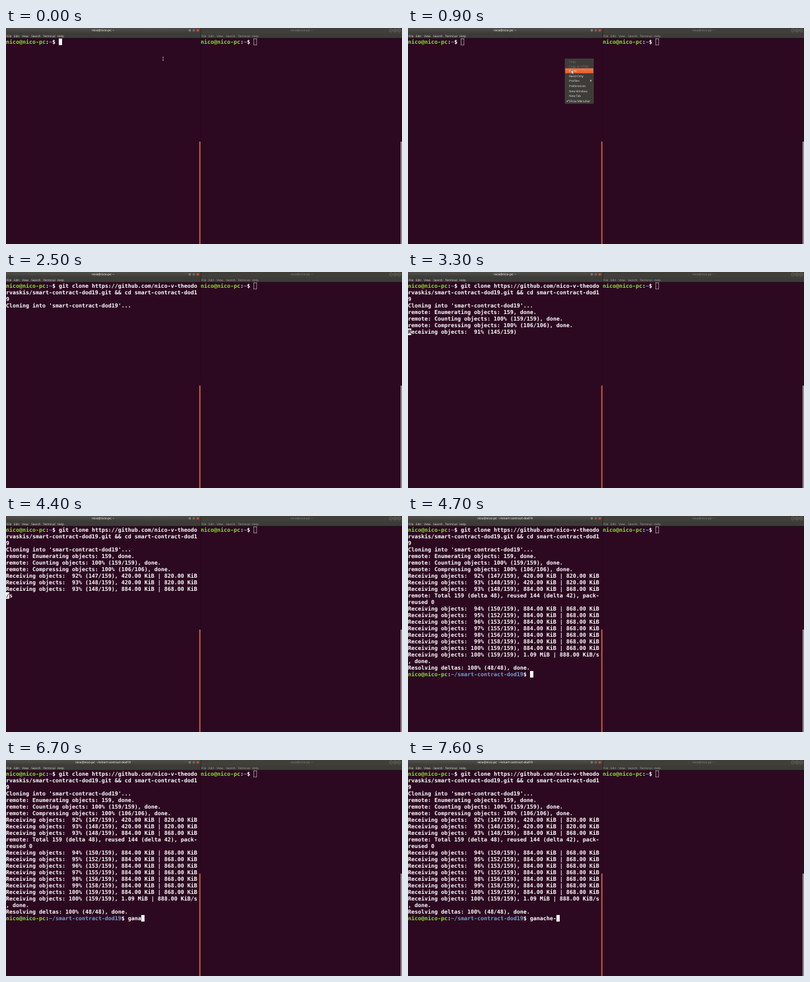
Animation of 600 by 329 pixels, one loop 8000 ms. Source, as an HTML page:

```html
<!DOCTYPE html>
<html lang="en">
<head>
<meta charset="utf-8">
<title>Terminal session</title>
<style>
  html, body { margin: 0; width: 100%; height: 100%; overflow: hidden; background: #2c0920; }
  svg { display: block; width: 100vw; height: 100vh; }
  text { white-space: pre; text-rendering: geometricPrecision; }
  .term text { font: bold 8.3px "DejaVu Sans Mono", monospace; fill: #fff; }
  .ui { font: 4.55px "Open Sans", "Noto Sans", sans-serif; }
  .title { font-weight: 600; text-anchor: middle; }
</style>
</head>
<body>
<svg id="stage" viewBox="0 0 600 329">
  <defs>
    <linearGradient id="bar" x2="0" y2="1">
      <stop offset="0" stop-color="#504f49"/>
      <stop offset="1" stop-color="#3c3b37"/>
    </linearGradient>
    <linearGradient id="hot" x2="0" y2="1">
      <stop offset="0" stop-color="#f0794c"/>
      <stop offset="1" stop-color="#e65a2b"/>
    </linearGradient>
  </defs>
  <rect width="600" height="329" fill="#2c0920"/>
</svg>
<script>
const LOOP = 8000, STEP = 100;
const BG = '#2c0920', GREEN = '#8ae234', BLUE = '#729fcf', WHITE = '#fff';
const CELL = 8.3 * 0.60205, ROW = 10, TOP = 16.1, RIGHT = 295;
const stage = document.getElementById('stage');

function add(parent, tag, attrs = {}, content) {
  const el = document.createElementNS('http://www.w3.org/2000/svg', tag);
  for (const k in attrs) el.setAttribute(k, attrs[k]);
  if (content !== undefined) el.textContent = content;
  parent.append(el);
  return el;
}

// Window frames
function frame(x, width, active, titleX) {
  const g = add(stage, 'g', { class: 'ui' });
  const ink = active ? '#dfdbd2' : '#a5a198';
  add(g, 'rect', { x, y: 0, width, height: 15.2, fill: '#3c3b37' });
  add(g, 'rect', { x, y: 0, width, height: 8.5, fill: active ? 'url(#bar)' : '#403f3a' });
  const labels = [['File', 1], ['Edit', 12], ['View', 24.3], ['Search', 38.3], ['Terminal', 56.2], ['Help', 78]];
  for (const [label, dx] of labels) add(g, 'text', { x: x + dx, y: 14, fill: ink }, label);
  const right = x + width;
  [16.6, 10.5, 4.4].forEach((dx, i) => {
    const close = active && i === 2;
    add(g, 'circle', {
      cx: right - dx, cy: 3.6, r: 2.4, 'stroke-width': 0.6,
      fill: close ? '#e4572c' : active ? '#85827a' : '#403f3a',
      stroke: active ? '#2f2e2a' : '#77746c'
    });
    const d = ['M-1 0H1', 'M-.8-.8H.8V.8H-.8Z', 'M-.9-.9L.9.9M.9-.9L-.9.9'][i];
    add(g, 'path', {
      d, transform: `translate(${right - dx} 3.6)`, fill: 'none',
      stroke: active ? '#33322e' : '#77746c', 'stroke-width': 0.5
    });
  });
  add(g, 'rect', { x: right - 2.2, y: 173, width: 2, height: 156, fill: active ? '#cb6449' : '#a3989d' });
  return add(g, 'text', { class: 'title', x: titleX, y: 5.3, fill: active ? '#e6e2d9' : '#7d7a72' }, 'nico@nico-pc: ~');
}

const title = frame(0, 295, true, 147);
frame(RIGHT, 305, false, 448);
add(stage, 'rect', { x: 294.8, y: 0, width: 0.5, height: 329, fill: '#230719' });

// Terminal contents: a row is a list of [text, colour] runs
const prompt = (path, rest = '') => [['nico@nico-pc', GREEN], [':', WHITE], [path, BLUE], ['$ ' + rest, WHITE]];
const plain = text => [[text, WHITE]];

function drawRow(parent, x, row, runs) {
  const el = add(parent, 'text', { x, y: TOP + row * ROW + 7.7 });
  for (const [text, fill] of runs) add(el, 'tspan', { style: 'fill:' + fill }, text);
}

function drawCursor(parent, x, row, col, hollow, char) {
  const left = x + col * CELL, y = TOP + row * ROW;
  if (hollow) {
    add(parent, 'rect', { x: left + 0.3, y: y + 0.2, width: CELL - 0.4, height: 9.6, fill: 'none', stroke: '#d8cfd5', 'stroke-width': 0.6 });
    return;
  }
  add(parent, 'rect', { x: left, y, width: CELL, height: ROW, fill: WHITE });
  if (char) add(parent, 'text', { x: left, y: y + 7.7, style: 'fill:' + BG }, char);
}

const other = add(stage, 'g', { class: 'term' });
drawRow(other, RIGHT, 0, prompt('~'));
drawCursor(other, RIGHT, 0, 16, true);

// Output events: [time, row, text]; later ones overwrite the row
const repo = 'smart-contract-dod19';
const got = (pct, n, tail = '') => `Receiving objects: ${String(pct).padStart(3)}% (${n}/159)${tail}`;
const fast = ', 884.00 KiB | 868.00 KiB', slow = ', 420.00 KiB | 820.00 KiB';
const output = [
  [1200, 1, `rvaskis/${repo}.git && cd ${repo.slice(0, -1)}`],
  [1200, 2, '9'],
  [1900, 3, `Cloning into '${repo}'...`],
  [3200, 4, 'remote: Enumerating objects: 159, done.'],
  [3200, 5, 'remote: Counting objects: 100% (159/159), done.'],
  [3200, 6, 'remote: Compressing objects: 100% (106/106), done.'],
  [3300, 7, got(91, 145)],
  [3400, 7, got(92, 147)],
  [3800, 7, got(92, 147, slow)],
  [3800, 8, '/s'],
  [3900, 8, got(93, 148, slow)],
  [3900, 9, '/s'],
  [4400, 9, got(93, 148, fast)],
  [4400, 10, '/s'],
  [4500, 10, 'remote: Total 159 (delta 48), reused 144 (delta 42), pack-'],
  [4500, 11, 'reused 0']
];
[150, 152, 153, 155, 156, 158, 159].forEach((n, i) => {
  const t = i < 2 ? 4500 : i < 5 ? 4600 : 4700;
  output.push([t, 12 + i, got(94 + i, n, fast)], [t, 13 + i, '/s']);
});
output.push(
  [4700, 19, got(100, 159, ', 1.09 MiB | 888.00 KiB/s')],
  [4700, 20, ', done.'],
  [4700, 21, 'Resolving deltas: 100% (48/48), done.']
);

const places = [[0, 0, 16], [1200, 2, 1], [1900, 4, 0], [3300, 7, 0], [3800, 8, 0], [3900, 9, 0],
  [4400, 10, 0], [4500, 14, 0], [4600, 17, 0], [4700, 22, 37]];
const blink = [1700, 1900, 2500, 3100, 3700, 4300, 4900, 5500, 6100, 6300];
const keys = [6400, 6500, 6700, 6700, 6900, 7200, 7300, 7600];
const passed = (times, t) => times.filter(v => v <= t).length;

const term = add(stage, 'g', { class: 'term' });
function drawTerminal(t) {
  term.replaceChildren();
  const rows = [prompt('~', t < 1200 ? '' : 'git clone https://github.com/nico-v-theodo')];
  for (const [at, row, text] of output) if (at <= t) rows[row] = plain(text);
  const typed = passed(keys, t);
  if (t >= 4700) rows[22] = prompt('~/' + repo, 'ganache-'.slice(0, typed));
  rows.forEach((runs, i) => drawRow(term, 0, i, runs));

  if (passed(blink, t) % 2 === 0) {
    const [, row, col] = places.filter(p => p[0] <= t).pop();
    const line = (rows[row] || []).map(r => r[0]).join('');
    drawCursor(term, 0, row, col + typed, t >= 100 && t < 1100, line[col + typed]);
  }
}

// Context menu
const menu = add(stage, 'g', { class: 'ui' });
add(menu, 'rect', { x: 238, y: 47, width: 43, height: 68, fill: '#3d3c38', stroke: '#55534c', 'stroke-width': 0.5 });
const hot = add(menu, 'rect', { x: 238.2, y: 61.4, width: 42.6, height: 7.6, fill: 'url(#hot)' });
const items = [['Copy', 51], ['Copy as HTML', 58.4], ['Paste', 65.2], ['Read-Only', 73], ['Profiles', 80.4],
  ['Preferences', 88], ['New Window', 96], ['New Tab', 103.2], ['Show Menubar', 111.2]];
items.forEach(([label, y], i) =>
  add(menu, 'text', { x: 244, y: y + 1.6, fill: i < 2 ? '#77746c' : '#e6e2d9' }, label));
add(menu, 'path', { d: 'M276.2 78.6L278.4 80.2L276.2 81.8Z', fill: '#dfdbd2' });
add(menu, 'path', { d: 'M240.2 110.9L241.3 112.3L243.2 109.4', fill: 'none', stroke: '#dfdbd2', 'stroke-width': 0.8 });

// Pointer shapes
const beam = add(stage, 'path', { d: 'M-1-2.6H1M0-2.6V2.6M-1 2.6H1', fill: 'none', stroke: '#d6ccd2', 'stroke-width': 0.6 });
const arrow = add(stage, 'path', {
  d: 'M0 0V6L1.4 4.8L2.3 6.9L3.2 6.5L2.3 4.5H4.2Z', fill: WHITE, stroke: '#222', 'stroke-width': 0.4
});

const show = (el, on) => el.setAttribute('visibility', on ? 'visible' : 'hidden');

function drawPointer(t) {
  const p = Math.min(1, Math.max(0, (t - 400) / 500));
  const k = p * p * (3 - 2 * p);
  const x = 238 + 9.5 * k, y = 47 + 17 * k;
  const open = t >= 100 && t < 1200;
  const at = `translate(${x} ${y})`;
  arrow.setAttribute('transform', at);
  beam.setAttribute('transform', at);
  show(arrow, open);
  show(beam, !open && t < 1900);
  show(menu, open);
  show(hot, open && y >= 61.4);
  menu.setAttribute('opacity', t < 200 || t >= 1100 ? 0.55 : 1);
}

let last = -1;
const start = performance.now();
function tick(now) {
  const t = Math.floor((Math.max(0, now - start) % LOOP) / STEP) * STEP;
  if (t !== last) {
    last = t;
    drawTerminal(t);
    drawPointer(t);
    title.textContent = 'nico@nico-pc: ~' + (t >= 4700 ? '/' + repo : '');
  }
  requestAnimationFrame(tick);
}
tick(start);
</script>
</body>
</html>
```
